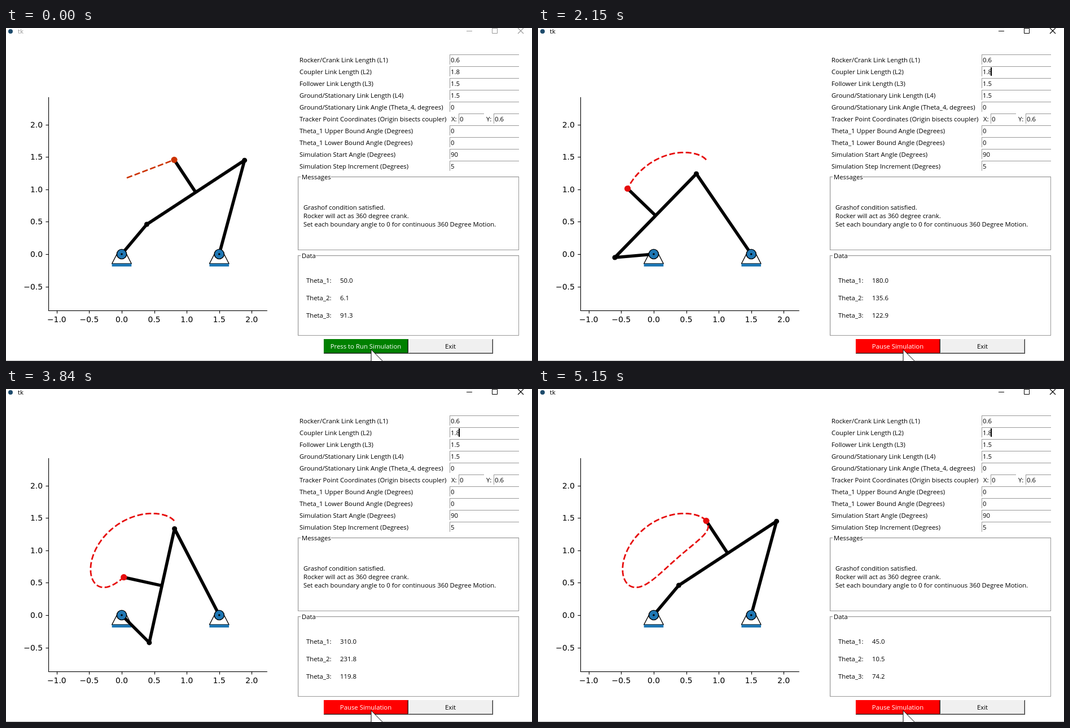
Recreate the animation shown at these times as an HTML page with a canvas. Size 932 px wide and 592 px high, loop 5220 ms.

```html
<!DOCTYPE html>
<html lang="en">
<head>
<meta charset="utf-8">
<title>tk</title>
<style>
html, body { margin: 0; width: 100%; height: 100%; overflow: hidden; background: #fff; }
canvas { display: block; }
</style>
</head>
<body>
<canvas id="stage" width="932" height="592"></canvas>
<script>
const ctx = document.getElementById('stage').getContext('2d');
const UI = '11.35px "Open Sans", "Noto Sans", sans-serif';
const PLOT = '13.9px "DejaVu Sans", sans-serif';
const LOOP = 5220, STEP = 76.85, FIRST = 311.5;
const L1 = 0.6, L2 = 1.8, L3 = 1.5, L4 = 1.5, TRACK = 0.6;
const UNIT = 115.2, OX = 205, OY = 402;
const BLUE = '#1f77b4', EDGE = '#999';
const DOUBLE_STEPS = [13, 20, 26, 32, 39, 45, 51, 57];

const px = p => [OX + p[0] * UNIT, OY - p[1] * UNIT];
const deg = r => ((r * 180 / Math.PI) % 360 + 360) % 360;

// Four-bar linkage solved for a crank angle in degrees
function solve(theta) {
  const r = theta * Math.PI / 180;
  const a = [L1 * Math.cos(r), L1 * Math.sin(r)];
  const dx = L4 - a[0], dy = -a[1], d = Math.hypot(dx, dy);
  const u = [dx / d, dy / d];
  const m = (L2 * L2 - L3 * L3 + d * d) / (2 * d);
  const h = Math.sqrt(L2 * L2 - m * m);
  const b = [a[0] + m * u[0] - h * u[1], a[1] + m * u[1] + h * u[0]];
  const mid = [(a[0] + b[0]) / 2, (a[1] + b[1]) / 2];
  const n = [(a[1] - b[1]) / L2, (b[0] - a[0]) / L2];
  const tip = [mid[0] + n[0] * TRACK, mid[1] + n[1] * TRACK];
  const coupler = Math.atan2(b[1] - a[1], b[0] - a[0]);
  return {
    a: px(a), b: px(b), mid: px(mid), tip: px(tip),
    angles: [deg(r), deg(r - coupler), deg(Math.atan2(b[1], b[0] - L4))]
  };
}

function text(s, x, y, color = '#000', align = 'left', font = UI) {
  ctx.font = font;
  ctx.fillStyle = color;
  ctx.textAlign = align;
  ctx.fillText(s, x, y);
}

function rect(x, y, w, h, color) {
  ctx.fillStyle = color;
  ctx.fillRect(x, y, w, h);
}

function path(points, width, color, cap = 'butt', dash = []) {
  ctx.beginPath();
  points.forEach(p => ctx.lineTo(p[0], p[1]));
  ctx.lineWidth = width;
  ctx.strokeStyle = color;
  ctx.lineCap = cap;
  ctx.lineJoin = 'round';
  ctx.setLineDash(dash);
  ctx.stroke();
  ctx.setLineDash([]);
}

function dot(x, y, r, color) {
  ctx.beginPath();
  ctx.arc(x, y, r, 0, 2 * Math.PI);
  ctx.fillStyle = color;
  ctx.fill();
}

function titleBar(active) {
  const c = active ? '#000' : '#999';
  dot(8, 6, 4, '#1d4a6b');
  text('tk', 21, 10, c);
  rect(816, 5, 10, 1, c);
  ctx.lineWidth = 1;
  ctx.strokeStyle = c;
  ctx.strokeRect(861.5, 0.5, 9, 9);
  path([[907, 0], [917, 10]], 1.1, c);
  path([[917, 0], [907, 10]], 1.1, c);
}

function entry(x, y, w, value) {
  rect(x, y, w, 1, EDGE);
  rect(x, y, 1, 18, EDGE);
  text(value, x + 2, y + 14);
}

function form() {
  const rows = [
    ['Rocker/Crank Link Length (L1)', '0.6'],
    ['Coupler Link Length (L2)', '1.8'],
    ['Follower Link Length (L3)', '1.5'],
    ['Ground/Stationary Link Length (L4)', '1.5'],
    ['Ground/Stationary Link Angle (Theta_4, degrees)', '0'],
    ['Tracker Point Coordinates (Origin bisects coupler)', null],
    ['Theta_1 Upper Bound Angle (Degrees)', '0'],
    ['Theta_1 Lower Bound Angle (Degrees)', '0'],
    ['Simulation Start Angle (Degrees)', '90'],
    ['Simulation Step Increment (Degrees)', '5']
  ];
  rows.forEach(([label, value], i) => {
    const y = 47 + 21 * i;
    text(label, 520, y + 14);
    if (value !== null) return entry(786, y, 123, value);
    text('X:', 789, y + 14);
    entry(802, y, 45, '0');
    text('Y:', 851, y + 14);
    entry(864, y, 45, '0.6');
  });
}

function group(label, y, bottom, gap) {
  rect(517, y, 392, 1, EDGE);
  rect(517, y, 1, bottom - y + 1, EDGE);
  rect(517, bottom, 392, 1, EDGE);
  rect(908, y, 1, bottom - y + 1, EDGE);
  rect(518, y + 1, 390, 1, '#e6e6e6');
  rect(518, y + 1, 1, bottom - y - 1, '#e6e6e6');
  rect(522, y - 2, gap, 5, '#fff');
  text(label, 524, y + 5);
}

function panels(values) {
  group('Messages', 264, 394, 54);
  text('Grashof condition satisfied.', 527, 323);
  text('Rocker will act as 360 degree crank.', 527, 338);
  text('Set each boundary angle to 0 for continuous 360 Degree Motion.', 527, 353);
  group('Data', 404, 546, 27);
  values.forEach((v, i) => {
    text(`Theta_${i + 1}:`, 532, 453 + 31 * i);
    text(v.toFixed(1), 592, 453 + 31 * i);
  });
}

function button(x, label, face, ink, shade, sunken) {
  rect(x, 553, 150, 26, face);
  if (sunken) {
    rect(x, 553, 150, 1, '#696969');
    rect(x, 553, 1, 26, '#696969');
  } else {
    rect(x + 1, 577, 148, 1, shade);
    rect(x + 148, 554, 1, 24, shade);
    rect(x, 578, 150, 1, '#333');
    rect(x + 149, 553, 1, 26, '#333');
  }
  const push = sunken ? 1 : 0;
  text(label, x + 74.5 + push, 570 + push, ink, 'center');
}

function pointer() {
  ctx.beginPath();
  [[647, 571.5], [647, 600], [675, 600]].forEach(p => ctx.lineTo(p[0], p[1]));
  ctx.closePath();
  ctx.fillStyle = '#fff';
  ctx.fill();
  ctx.lineWidth = 1;
  ctx.strokeStyle = '#000';
  ctx.stroke();
}

function axes() {
  const num = v => v.toFixed(1).replace('-', '\u2212');
  rect(75, 123, 1.1, 380, '#000');
  rect(75, 502, 388, 1.1, '#000');
  for (let v = -1; v <= 2; v += 0.5) {
    const x = OX + v * UNIT;
    rect(Math.round(x), 503, 1.1, 4.5, '#000');
    text(num(v), x, 523, '#000', 'center', PLOT);
  }
  for (let v = -0.5; v <= 2; v += 0.5) {
    const y = OY - v * UNIT;
    rect(70.5, Math.round(y), 4.5, 1.1, '#000');
    text(num(v), 65, y + 5, '#000', 'right', PLOT);
  }
}

function support(x) {
  ctx.beginPath();
  [[-17.3, 17], [-8.6, 0], [8.6, 0], [17.3, 17]].forEach(p => ctx.lineTo(x + p[0], OY + p[1]));
  ctx.closePath();
  ctx.fillStyle = '#fff';
  ctx.fill();
  ctx.lineWidth = 1.4;
  ctx.strokeStyle = '#000';
  ctx.stroke();
  rect(x - 17.3, 419, 34.6, 5, BLUE);
}

function pivot(x) {
  dot(x, OY, 9.3, '#000');
  dot(x, OY, 7.9, BLUE);
  dot(x, OY, 1.8, '#000');
}

function linkage(pose, trail, red) {
  const right = OX + L4 * UNIT;
  support(OX);
  support(right);
  path([[OX, OY], pose.a, pose.b, [right, OY]], 5.6, '#000');
  path([pose.mid, pose.tip], 5.6, '#000');
  dot(...pose.a, 4.5, '#000');
  dot(...pose.b, 4.5, '#000');
  path(trail, 2.78, red, 'butt', [10.3, 4.4]);
  dot(...pose.tip, 5.6, red);
  pivot(OX);
  pivot(right);
}

function draw(now) {
  const t = Math.floor((now % LOOP) / 10) * 10;
  const k = Math.max(-1, Math.ceil((t + 10 - FIRST) / STEP) - 1);
  const running = k >= 0;
  const pressed = !running && t >= 80;
  const theta = 50 + 5 * (k + 1 + DOUBLE_STEPS.filter(s => s <= k).length);
  const pose = solve(theta);

  let trail = [[214, 266.5], pose.tip];
  let values = [50, 6.1, 91.3];
  if (running) {
    trail = [];
    for (let a = 50; a <= theta; a += 5) trail.push(solve(a).tip);
    values = solve(theta - 5).angles;
  }

  rect(0, 0, 932, 592, '#fff');
  titleBar(t >= 80);
  axes();
  linkage(pose, trail, running ? '#e60c0c' : '#cc3300');
  form();
  panels(values);

  const shown = FIRST + STEP * k;
  if (running && (shown - 200) % 900 < 600) rect(802, 70, 2, 15, '#000');

  if (running) button(563, 'Pause Simulation', '#ff0000', '#fff', '#990000');
  else if (pressed) button(563, 'Press to Run Simulation', '#f0f0f0', '#000', '#a0a0a0', true);
  else button(563, 'Press to Run Simulation', '#008000', '#fff', '#004d00');
  button(713, 'Exit', '#f0f0f0', '#000', '#a0a0a0');
  rect(0, 591, 932, 1, '#b8b8b8');
  pointer();
}

const start = performance.now();
function tick() {
  draw(performance.now() - start);
  requestAnimationFrame(tick);
}
tick();
</script>
</body>
</html>
```
